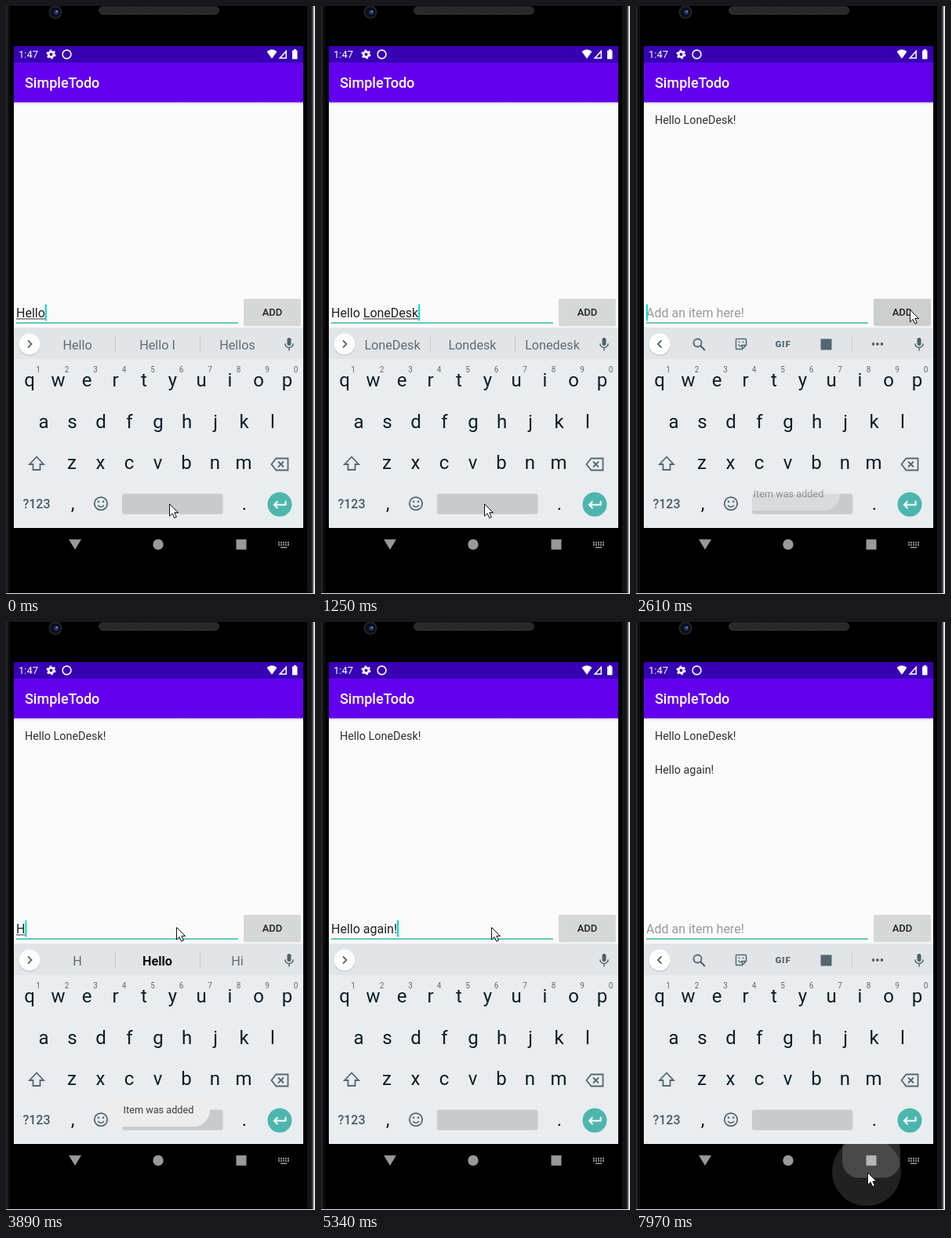
An HTML page that plays this animation: 394x748 px, repeating every 8 s.

```html
<!DOCTYPE html>
<html lang="en">
<head>
<meta charset="utf-8">
<title>Todo app demo</title>
<style>
html, body { margin: 0; width: 100%; height: 100%; overflow: hidden; background: #000; }
svg { display: block; width: 100%; height: 100%; }
text { font-family: Roboto, "Noto Sans", sans-serif; white-space: pre; }
.mid { text-anchor: middle; }
.key { font-size: 24px; fill: #0b1d26; text-anchor: middle; }
.sup { font-size: 10px; fill: #5c6b73; text-anchor: middle; }
.sug { font-size: 16.2px; fill: #5f6d75; text-anchor: middle; }
.bold { font-weight: 700; fill: #0a0f12; }
.line { fill: none; stroke: #546770; stroke-width: 1.8; }
.item { font-size: 14.35px; fill: #303030; }
</style>
</head>
<body>
<svg viewBox="0 0 394 748" preserveAspectRatio="none">
  <defs>
    <linearGradient id="shade" x2="0" y2="1">
      <stop offset="0" stop-color="#000" stop-opacity=".14"/>
      <stop offset="1" stop-color="#000" stop-opacity="0"/>
    </linearGradient>
    <pattern id="mesh" width="4" height="4" patternUnits="userSpaceOnUse">
      <rect width="4" height="4" fill="#2b2b2c"/>
      <path d="M0 4L4 0" stroke="#222223"/>
    </pattern>
    <clipPath id="navClip"><rect y="664" width="394" height="84"/></clipPath>
  </defs>

  <!-- phone body -->
  <rect width="394" height="748"/>
  <rect width="2" height="748" fill="#242427"/>
  <rect x="2" width="3" height="748" fill="#0f0f11"/>
  <rect x="384" width="6" height="748" fill="#151517"/>
  <rect x="390" width="2" height="748" fill="#4a4a4f"/>
  <rect x="392" width="2" height="748" fill="#e0e0e0"/>
  <rect y="747" width="394" height="1" fill="#e6e6e6"/>
  <circle cx="63" cy="8" r="8.5" fill="#242426"/>
  <circle cx="63" cy="8" r="6.5" fill="#0b0d18"/>
  <circle cx="64" cy="8" r="3" fill="#26356f"/>
  <circle cx="65" cy="7" r="1" fill="#8c9ce0"/>
  <rect x="118.500" y="1" width="153" height="9.500" rx="4.700" fill="url(#mesh)" stroke="#343435"/>

  <!-- status bar and title -->
  <rect x="10" y="51" width="369" height="613" fill="#fafafa"/>
  <rect x="10" y="51" width="369" height="21" fill="#3700b3"/>
  <rect x="10" y="72" width="369" height="50.500" fill="#6200ee"/>
  <rect x="10" y="122.500" width="369" height="3.500" fill="url(#shade)"/>
  <text x="16" y="66" font-size="13" fill="#fff">1:47</text>
  <circle cx="57.500" cy="61.500" r="3.300" fill="none" stroke="#fff" stroke-width="2.600"/>
  <circle cx="57.500" cy="61.500" r="5.200" fill="none" stroke="#fff" stroke-width="1.700" stroke-dasharray="2.700 2.745"/>
  <circle cx="77.500" cy="61.500" r="5.400" fill="none" stroke="#fff" stroke-width="1.600"/>
  <path d="M332.500 58Q339 52.500 345.500 58L339 67Z M358 55.500V67H347.500Z" fill="#fff"/>
  <path d="M356.500 59.500V65.500H351Z" fill="#3700b3"/>
  <path d="M365 56.500H367V55H370V56.500H371.500V67.500H365Z" fill="#fff"/>
  <text x="24" y="104" font-size="18" font-weight="500" fill="#fff">SimpleTodo</text>

  <!-- keyboard -->
  <rect x="10" y="409" width="369" height="255" fill="#e9edf0"/>
  <rect x="10" y="409" width="369" height="40" fill="#e1e5e8"/>
  <circle cx="30" cy="431" r="14" fill="#000" opacity=".1"/>
  <circle cx="30" cy="430" r="13.500" fill="#fdfdfd"/>
  <rect x="358.500" y="422" width="5" height="10" rx="2.500" fill="#4e6069"/>
  <path class="line" d="M355.800 429.500a5.200 5 0 0 0 10.400 0M361 435V438.500" style="stroke-width:1.500"/>
  <g id="keys"></g>
  <text class="mid" x="39" y="639" font-size="16" font-weight="500" fill="#4b5d66">?123</text>
  <circle class="line" cx="121" cy="633" r="8.200"/>
  <path class="line" d="M117 635q4 4.500 8 0" style="stroke-width:1.500"/>
  <g fill="#546770"><circle cx="118" cy="630.500" r="1.300"/><circle cx="124" cy="630.500" r="1.300"/></g>
  <rect x="148" y="620.500" width="128.500" height="26" rx="3" fill="#c7cbce"/>
  <circle cx="349" cy="634" r="15.500" fill="#4db6ac"/>
  <path d="M356.500 629.500V634.500H342M346.500 630L342 634.500L346.500 639" fill="none" stroke="#fff" stroke-width="2"/>
  <path class="line" d="M39 573.500L30 583H34.500V590H43.500V583H48Z"/>
  <path class="line" d="M344.500 575.500H359.500V590.500H344.500L338.500 583ZM347 579.500L354 586.500M354 579.500L347 586.500"/>

  <!-- navigation bar -->
  <rect x="10" y="664" width="369" height="83" fill="#000"/>
  <g fill="#999">
    <path d="M80 678.500H96L88 691.500Z"/>
    <circle cx="194" cy="685" r="6.700"/>
    <rect x="293.500" y="678.500" width="13" height="13"/>
    <g id="navKeys"></g>
  </g>

  <g id="live"></g>
</svg>
<script>
const LOOP = 8000;
const $ = id => document.getElementById(id);

const row = (chars, x, y) => [...chars].map((c, i) =>
  `<text class="key" x="${x + i * 36.5}" y="${y}">${c}</text>`).join('');

$('keys').innerHTML =
  row('qwertyuiop', 30, 484) + row('asdfghjkl', 48, 536.5) + row('zxcvbnm', 84, 589) +
  row(',', 85, 641) + row('.', 304, 641) +
  [...'1234567890'].map((c, i) => `<text class="sup" x="${41 + i * 36.5}" y="466">${c}</text>`).join('');

let dots = '<rect x="350" y="688" width="8" height="1.5"/>';
for (let i = 0; i < 10; i++)
  dots += `<rect x="${347 + i % 5 * 3}" y="${681.5 + (i > 4) * 3}" width="2" height="2"/>`;
$('navKeys').innerHTML = dots;

const NAME = 'LoneDesk';
const HELLO = ['Hello', 'Hello I', 'Hellos'];

// Typing step: text before the composed word, the word, and its suggestions
const type = (done, word, tips, bold) => ({ done, word, tips, bold, caret: true, tools: false });
const finish = text => ({ done: text, word: '', tips: [], caret: true });
const cleared = { done: '', word: '', caret: true };

// Each step changes only the listed properties
const steps = [
  [0, { ...type('', 'Hello', HELLO), items: 0, toast: 0, button: '#d6d7d7', mouse: [208, 633], ripple: false }],
  [150, type('Hello ', 'L', ['L', 'Love', 'Let'])],
  [290, type('Hello ', 'Lo', ['Lo', 'Love', 'Look'])],
  [410, type('Hello ', 'Lo', ['Lo', 'Look', 'Long'])],
  [560, type('Hello ', 'Lon', ['Lon', 'Long', 'Longer'])],
  [810, type('Hello ', 'Lone', ['Lone', 'Lonely', 'Loner'])],
  [1120, type('Hello ', 'LoneDes', ['LoneDes', 'Londes', 'Lonedes'])],
  [1250, type('Hello ', NAME, [NAME, 'Londesk', 'Lonedesk'])],
  [1640, finish(`Hello ${NAME}!`)],
  [1790, { tools: true }],
  [2190, { caret: false, mouse: [290, 480] }],
  [2310, { mouse: [349, 386] }],
  [2470, { ...cleared, button: '#c4c5c5' }],
  [2610, { items: 1, toast: .45, button: '#cdcece' }],
  [2760, { toast: .9, button: '#d6d7d7' }],
  [2890, { toast: 1, caret: false }],
  [3150, { mouse: [177, 388] }],
  [3270, { mouse: [244, 390] }],
  [3430, { mouse: [217, 388], caret: true }],
  [3890, type('', 'H', ['H', 'Hello', 'Hi'], true)],
  [4160, type('', 'He', ['He', 'Hey', 'Her'])],
  [4280, type('', 'Hel', ['Hel', 'Hello', 'Help'], true)],
  [4550, { ...type('', 'Hell', ['Hell', 'Hello', 'Hells']), toast: .6 }],
  [4670, { ...type('', 'Hello', HELLO), toast: 0 }],
  [4800, type('Hello ', 'a', ['a', 'and', 'again'])],
  [4920, type('Hello ', 'ag', ['ag', 'again', 'ago'])],
  [5060, type('Hello ', 'again', ['again', 'against', 'agains'])],
  [5340, finish('Hello again!')],
  [5490, { tools: true }],
  [5890, { caret: false, mouse: [262, 390] }],
  [6010, { mouse: [325, 389] }],
  [6130, { mouse: [341, 388] }],
  [6250, { ...cleared, button: '#c4c5c5' }],
  [6370, { items: 2, toast: .45, button: '#d3d4d4' }],
  [6500, { toast: .9, button: '#d6d7d7' }],
  [6620, { toast: 1, caret: false }],
  [7050, { caret: true }],
  [7320, { mouse: [218, 288] }],
  [7570, { caret: false }],
  [7970, { mouse: [295, 700], toast: 0, ripple: true }]
];

const pen = document.createElement('canvas').getContext('2d');
const width = s => {
  pen.font = '16px Roboto, "Noto Sans", sans-serif';
  return pen.measureText(s).width;
};
const divider = x => `<rect x="${x}" y="419" width="1" height="22" fill="#c3c9cd"/>`;

const toolbar = `
  <path class="line" d="M32.500 425.500L28 430L32.500 434.500"/>
  <circle class="line" cx="78.500" cy="428.500" r="5"/>
  <path class="line" d="M82.500 432.500L88 438" style="stroke-width:2.200"/>
  <path class="line" d="M128.500 423.500H139.500Q140.500 423.500 140.500 424.500V431.500L135.500 436.500H128.500Q127.500 436.500 127.500 435.500V424.500Q127.500 423.500 128.500 423.500ZM140.500 431.500H135.500V436.500M130.500 430.500q2.500 3.500 5 1" style="stroke-width:1.500"/>
  <g fill="#546770">
    <circle cx="131.500" cy="427.500" r="1"/><circle cx="136.500" cy="427.500" r="1"/>
    <text class="mid" x="187.500" y="434" font-size="11.500" font-weight="900" letter-spacing=".8">GIF</text>
    <rect x="235.500" y="423.500" width="14" height="14"/>
    <circle cx="302.500" cy="430" r="1.900"/><circle cx="308" cy="430" r="1.900"/><circle cx="313.500" cy="430" r="1.900"/>
  </g>` + divider(275);

function strip(s) {
  if (s.tools) return toolbar;
  const tips = s.tips.map((t, i) =>
    `<text class="sug${s.bold && i === 1 ? ' bold' : ''}" x="${91 + i * 102}" y="436.5">${t}</text>`).join('');
  return '<path class="line" d="M28 425.5L32.500 430L28 434.5"/>' + tips +
    (tips && divider(139) + divider(247));
}

function field(s) {
  const text = s.done + s.word;
  const start = 13 + width(s.done), end = 13 + width(text);
  return `<rect x="13" y="402.5" width="283" height="1.5" fill="#35b9a9"/>
    <text x="13" y="396" font-size="16" fill="${text ? '#212121' : '#9a9a9a'}">${text || 'Add an item here!'}</text>` +
    (s.word && `<rect x="${start}" y="397.5" width="${end - start}" height="1" fill="#333"/>`) +
    (s.caret ? `<rect x="${end}" y="379.5" width="2" height="21" fill="#03dac5"/>` : '');
}

const toast = alpha => `<g opacity="${alpha}">
  <rect x="128" y="600" width="132" height="42" rx="21" fill="#ededed"/>
  <text class="mid" x="194.500" y="625" font-size="12.700" fill="#3c3c3c">Item was added</text></g>`;

const ripple = `<circle cx="294" cy="699" r="44" fill="#fff" opacity=".13"/>
  <rect x="263" y="650" width="74" height="57" rx="21" fill="#fff" opacity=".18" clip-path="url(#navClip)"/>`;

const pointer = ([x, y]) => `<path transform="translate(${x + .5} ${y + .5})"
  d="M0 0V15.500L3.600 12L6.200 17.800L8.900 16.600L6.300 11H11Z" fill="#fff" stroke="#111"/>`;

function render(s) {
  const items = [`Hello ${NAME}!`, 'Hello again!'].slice(0, s.items);
  $('live').innerHTML =
    items.map((t, i) => `<text class="item" x="24" y="${149.5 + i * 43}">${t}</text>`).join('') +
    field(s) +
    `<rect x="303" y="373.5" width="73" height="34" rx="2" fill="#000" opacity=".12"/>
     <rect x="303" y="372.5" width="73" height="34" rx="2" fill="${s.button}"/>
     <text class="mid" x="339.500" y="394" font-size="13" font-weight="500" fill="#222">ADD</text>` +
    strip(s) + (s.toast ? toast(s.toast) : '') + (s.ripple ? ripple : '') + pointer(s.mouse);
}

const begin = performance.now();
let shown = 0;

function tick() {
  const t = (performance.now() - begin) % LOOP;
  const past = steps.filter(([at]) => at <= t);
  if (past.length !== shown) {
    shown = past.length;
    render(Object.assign({}, ...past.map(([, change]) => change)));
  }
  requestAnimationFrame(tick);
}
tick();
</script>
</body>
</html>
```
